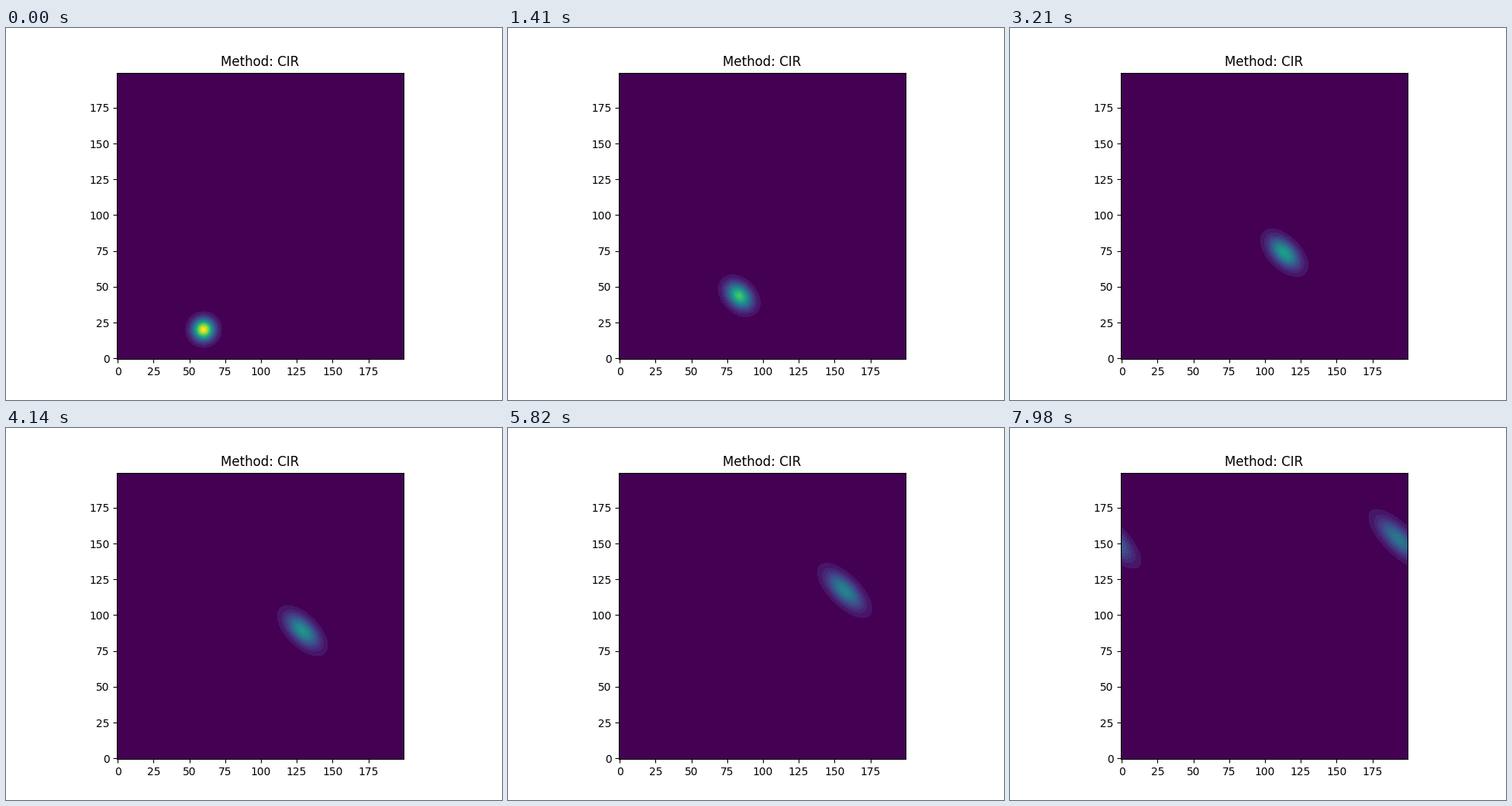
A matplotlib script for the animation above (8000 ms loop, 640x480 px).

```python
import numpy as np
import matplotlib.pyplot as plt
from matplotlib.animation import FuncAnimation
from matplotlib.colors import BoundaryNorm, ListedColormap

SIZE = 200
STEPS = 267
LOOP_MS = 8000
CFL = 0.5
START = (60, 20)
SIGMA = 5.0


def gaussian():
    y, x = np.mgrid[:SIZE, :SIZE]
    r2 = (x - START[0]) ** 2 + (y - START[1]) ** 2
    return np.exp(-r2 / (2 * SIGMA ** 2))


def upwind(u):
    """One first-order upwind step along +x and +y on a periodic grid."""
    left = np.roll(u, 1, axis=1)
    below = np.roll(u, 1, axis=0)
    return u - CFL * (u - left) - CFL * (u - below)


def banded_viridis(first=0.037, step=0.047):
    edges = np.arange(first, 1.0, step)
    mids = np.clip(edges + step / 2, 0, 1)
    cmap = ListedColormap(plt.get_cmap("viridis")(np.r_[0, mids]))
    norm = BoundaryNorm(np.r_[-0.1, edges, 1.1], cmap.N)
    return cmap, norm


fields = [gaussian()]
for _ in range(STEPS - 1):
    fields.append(upwind(fields[-1]))

fig, ax = plt.subplots(figsize=(6.4, 4.8), dpi=100)
cmap, norm = banded_viridis()
image = ax.imshow(fields[0], origin="lower", cmap=cmap, norm=norm)
ax.set_title("Method: CIR")


def update(i):
    image.set_data(fields[i])
    return (image,)


anim = FuncAnimation(fig, update, frames=STEPS, interval=LOOP_MS / STEPS,
                     repeat=True, repeat_delay=0, blit=False)
plt.show()
```
